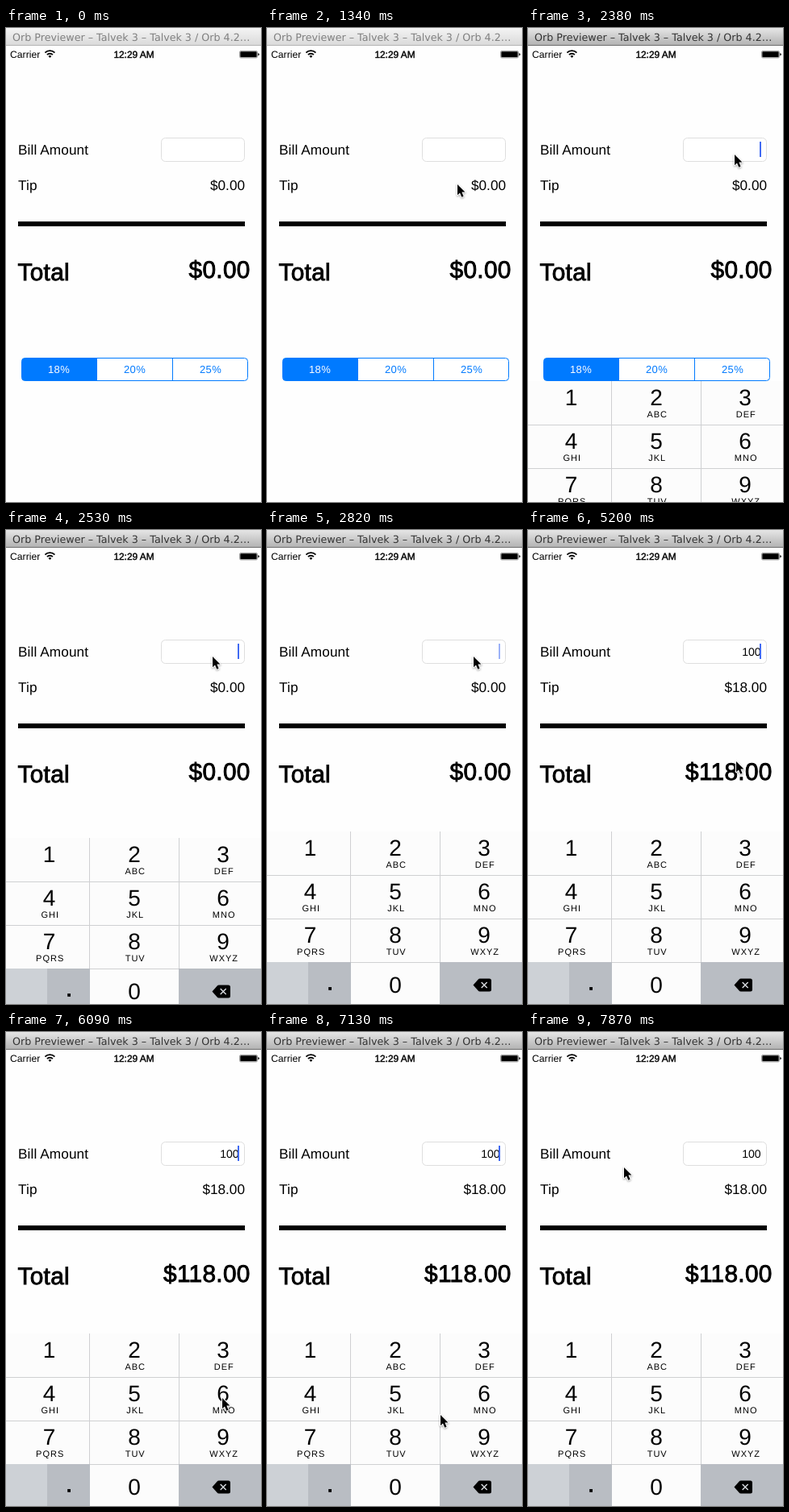
An HTML page that plays this animation: 316x588 px, repeating every 8000 ms.

```html
<!DOCTYPE html>
<html lang="en">
<head>
<meta charset="utf-8">
<title>Tip calculator</title>
<style>
  html, body { margin: 0; width: 100%; height: 100%; overflow: hidden; background: #fefefe; }
  svg { display: block; width: 316px; height: 588px; }
  text { font-family: "Liberation Sans", Arial, sans-serif; text-rendering: geometricPrecision; white-space: pre; }
  .title { font: 12.7px "DejaVu Sans", sans-serif; fill: #808080; }
  .active .title { fill: #333; }
  .bar { fill: url(#idle); }
  .active .bar { fill: url(#live); }
  .edge { fill: #b4b4b4; }
  .active .edge { fill: #6e6e6e; }
  .body { font-size: 17.2px; }
  .label { letter-spacing: .1px; }
  .big { font-size: 29.8px; letter-spacing: .3px; stroke: #000; stroke-width: .9px; }
  .end { text-anchor: end; }
  .mid { text-anchor: middle; }
  .seg { font-size: 13px; letter-spacing: .4px; fill: #007aff; }
  .digit { font-size: 28px; }
  .abc { font-size: 11px; letter-spacing: 1px; }
  #cursor { filter: drop-shadow(0 1px 1px rgba(0, 0, 0, .35)); }
</style>
</head>
<body>
<svg id="stage" viewBox="0 0 316 588">
  <defs>
    <linearGradient id="idle" x2="0" y2="1">
      <stop stop-color="#f4f4f4"/><stop offset="1" stop-color="#dadada"/>
    </linearGradient>
    <linearGradient id="live" x2="0" y2="1">
      <stop stop-color="#e6e6e6"/><stop offset="1" stop-color="#b3b3b3"/>
    </linearGradient>
  </defs>
  <rect width="316" height="588" fill="#fefefe"/>

  <rect class="bar" width="316" height="21"/>
  <rect class="edge" y="21" width="316" height="1"/>
  <text class="title" x="8" y="16">Orb Previewer – Talvek 3 – Talvek 3 / Orb 4.2…</text>

  <text x="5" y="37" font-size="12.2">Carrier</text>
  <g fill="none" stroke="#000" stroke-width="1.8">
    <path d="M48.4 30.6a8.4 8.4 0 0 1 12 0M50.9 33.2a4.9 4.9 0 0 1 7 0"/>
    <path d="M54.4 37l-1.9-2a2.7 2.7 0 0 1 3.8 0z" fill="#000" stroke="none"/>
  </g>
  <text class="mid" x="158.5" y="37" font-size="11.9" stroke="#000" stroke-width=".4">12:29 AM</text>
  <rect x="289.5" y="28.500" width="22" height="8.500" rx="1.500" fill="none" stroke="#777" stroke-width=".7"/>
  <rect x="290.3" y="29.3" width="20.400" height="6.900" rx=".8"/>
  <path d="M312.3 31v3.6q1.6-.6 1.6-1.8t-1.6-1.8z"/>

  <text class="body label" x="15" y="157">Bill Amount</text>
  <rect x="192.5" y="136.5" width="103" height="29" rx="5" fill="#fff" stroke="#dedede"/>
  <text class="end" id="bill" x="288.6" y="156" font-size="14"></text>
  <rect id="caret" x="287" y="141" width="2" height="19" fill="#426bf2"/>
  <text class="body label" x="15" y="201">Tip</text>
  <text class="body end" id="tip" x="296" y="201"></text>
  <rect x="15" y="240" width="281" height="6"/>
  <text class="big" x="14.5" y="312.5">Total</text>
  <text class="big end" id="total" x="302.7" y="309.5"></text>

  <rect x="19.5" y="409.5" width="280" height="28" rx="4" fill="#fff" stroke="#007aff"/>
  <path d="M113 409.5H23.5a4 4 0 0 0-4 4v20a4 4 0 0 0 4 4H113z" fill="#007aff"/>
  <path d="M206.5 409.5v28" stroke="#007aff"/>
  <text class="seg mid" x="65.5" y="428" style="fill:#fff">18%</text>
  <text class="seg mid" x="159.5" y="428">20%</text>
  <text class="seg mid" x="253.5" y="428">25%</text>

  <g id="pad">
    <rect y="374" width="316" height="216" fill="#fcfcfc"/>
    <path d="M0 428.5h316M0 482.5h316M0 536.5h316M103.5 374v216M214.5 374v216" stroke="#cfd0d2"/>
    <rect y="536" width="51" height="54" fill="#cdd1d6"/>
    <path d="M51 536h53v54H51zM214 536h102v54H214z" fill="#b9bdc3"/>
    <g id="keys"></g>
    <rect x="76.2" y="567" width="3.8" height="3.8"/>
    <path d="M255.5 564.5l6.2-7q.8-.9 2-.9h11.8q2.5 0 2.5 2.5v10.8q0 2.5-2.5 2.5h-11.8q-1.2 0-2-.9z"/>
    <path d="M265.7 561l7 7m0-7l-7 7" stroke="#d4d7db" stroke-width="1.5"/>
  </g>

  <path id="cursor" d="M0 0V13.2L3 10.4L5.3 15.7L7.6 14.7L5.4 9.6H9.5Z"
    stroke="#fff" stroke-width="2" paint-order="stroke" stroke-linejoin="round"/>
</svg>
<script>
const LOOP = 8000, TICK = 148.45, RATE = 0.18;
const ENTRY = "100";
const FOCUS = 15;                   // tick when the field gains focus
const taps = [FOCUS, 23, 26, 27];   // focus, then one tick per typed digit
const $ = id => document.getElementById(id);

// Pointer strokes; px and py set how early each axis covers its distance
const strokes = [
  { from: 3, ticks: 4, x: 230, y: 418, px: 1.5, py: 1.2 },
  { from: 8, ticks: 6, x: 256, y: 157, px: .65, py: 4.8 },
  { from: 34, ticks: 8, x: 268, y: 454, px: .7, py: 2 },
  { from: 42, ticks: 4, x: 270, y: 557, px: 1, py: 1.5 },
  { from: 48, ticks: 6, x: 119, y: 168, px: 2.5, py: 1.3 }
];

const clamp = n => Math.min(1, Math.max(0, n));
const easeOut = (u, power) => 1 - (1 - u) ** power;
const money = n => "$" + n.toFixed(2);

function pointer(tick) {
  let x = 245, y = 600;
  for (const s of strokes) {
    const u = clamp((tick - s.from + 1) / s.ticks);
    x += (s.x - x) * easeOut(u, s.px);
    y += (s.y - y) * easeOut(u, s.py);
  }
  return `translate(${Math.round(x)} ${Math.round(y)})`;
}

// The caret restarts its blink on every tap.
function caret(tick) {
  const last = taps.findLast(tap => tap <= tick);
  if (last === undefined) return 0;
  const phase = (tick - last) * TICK % 1030;
  return clamp((625 - phase) / 60);
}

// Critically damped rise of the keypad
function padOffset(tick) {
  const u = Math.max(0, (tick - FOCUS) * TICK - 15) / 1000 * 18.26;
  return Math.round(214 * Math.exp(-u) * (1 + u));
}

function addText(cls, x, y, value) {
  const el = document.createElementNS("http://www.w3.org/2000/svg", "text");
  el.setAttribute("class", cls + " mid");
  el.setAttribute("x", x);
  el.setAttribute("y", y);
  el.textContent = value;
  $("keys").append(el);
}

["", "ABC", "DEF", "GHI", "JKL", "MNO", "PQRS", "TUV", "WXYZ"].forEach((abc, i) => {
  const x = [53.5, 159, 269][i % 3], y = 403.5 + 54 * Math.floor(i / 3);
  addText("digit", x, y, i + 1);
  addText("abc", x + 1.2, y + 15.2, abc);
});
addText("digit", 159, 573.5, 0);

function draw(t) {
  const tick = Math.floor(t / TICK);
  const count = taps.filter(tap => tap <= tick).length - 1;
  const bill = ENTRY.slice(0, Math.max(0, count));
  const tip = bill * RATE;
  $("stage").classList.toggle("active", tick >= FOCUS);
  $("cursor").setAttribute("transform", pointer(tick));
  $("caret").setAttribute("opacity", caret(tick));
  $("pad").setAttribute("transform", `translate(0 ${padOffset(tick)})`);
  $("bill").textContent = bill;
  $("tip").textContent = money(tip);
  $("total").textContent = money(+bill + tip);
}

const start = performance.now();
function frame() {
  draw((performance.now() - start) % LOOP);
  requestAnimationFrame(frame);
}
frame();
</script>
</body>
</html>
```
